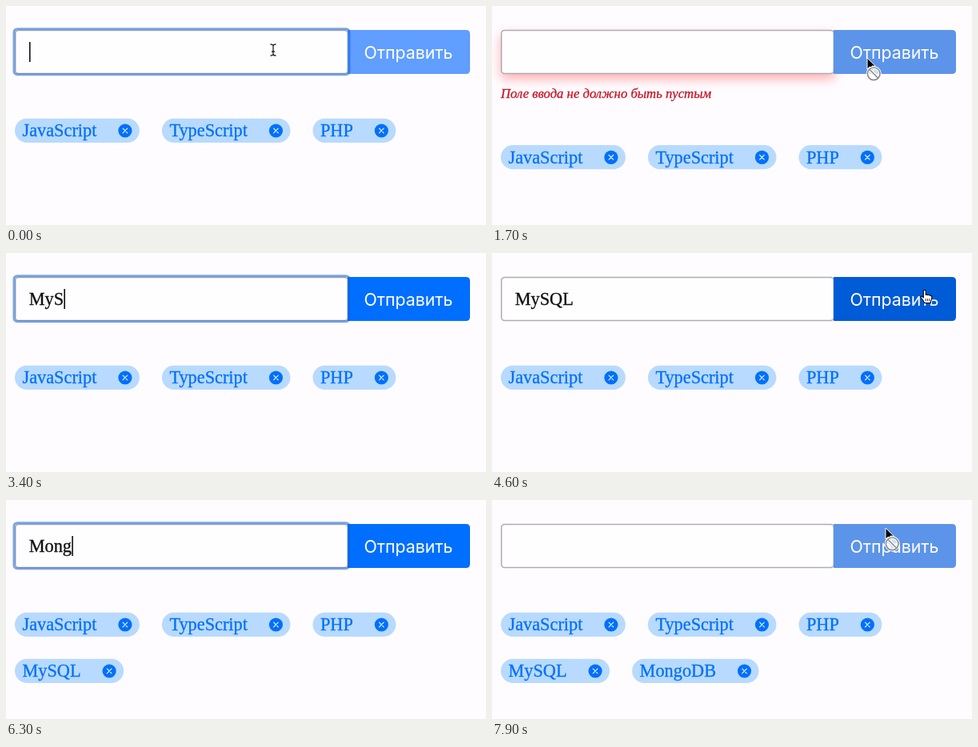
An HTML page that plays this animation: 600x274 px, repeating every 8 s.

```html
<!DOCTYPE html>
<html lang="ru">
<head>
<meta charset="utf-8">
<title>Теги</title>
<style>
  html, body { margin: 0; width: 100%; height: 100%; overflow: hidden; background: #fefcff; }
  svg { display: block; width: 600px; height: 274px; }
  .serif { font: 22.3px "Liberation Serif", Times, serif; stroke-width: .3; }
  .tag rect { fill: #b8daff; }
  .tag text { fill: #0070fa; stroke: #0070fa; }
  .tag circle { fill: #0070fa; }
  .tag path { stroke: #e4f1ff; stroke-width: 1.2; stroke-linecap: round; }
  .field { fill: #fefdff; stroke: #aeacae; stroke-width: 1.5; }
  .field.bad { filter: drop-shadow(0 6px 7px rgba(255, 50, 50, .38)); }
  .ring { fill: none; stroke: #0f62d8; stroke-opacity: .55; stroke-width: 3; }
  .label { font: 21.3px Inter, Roboto, sans-serif; fill: #fff; text-anchor: middle; }
  .error { font: italic 16.7px "Liberation Serif", Times, serif; fill: #c81424; stroke: #c81424; stroke-width: .3; }
  .typed { fill: #111; stroke: #111; }
  [hidden] { display: none; }
</style>
</head>
<body>
<svg viewBox="0 0 600 274">
  <rect id="field" class="field" x="11.75" y="30.4" width="415.5" height="54.2" rx="4"/>
  <path id="button" d="M427 30H575Q580 30 580 35V80Q580 85 575 85H427Z"/>
  <text class="label" x="503" y="66">Отправить</text>
  <rect id="ring" class="ring" x="10" y="28.7" width="419" height="57" rx="4"/>
  <text id="typed" class="serif typed" x="28.7" y="64.6"></text>
  <rect id="caret" y="45" width="1.6" height="25" fill="#111"/>
  <text id="error" class="error" x="11" y="115">Поле ввода не должно быть пустым</text>
  <g id="tags"></g>
  <g id="cursor">
    <path id="beam" d="M-3 -7Q0 -7 0 -5Q0 -7 3 -7M0 -5V5M-3 7Q0 7 0 5Q0 7 3 7M-1.5 2H1.5" fill="none" stroke="#222" stroke-width="1.3" stroke-linecap="round"/>
    <path id="arrow" d="M0 0V14L3.3 11L5.6 16.2L8.1 15.1L5.8 10.1H10.4Z" fill="#000" stroke="#fff" stroke-linejoin="round"/>
    <g id="ban" fill="none">
      <circle cx="8.2" cy="19.8" r="7.8" fill="#fff" fill-opacity=".7" stroke="#fff" stroke-width="3.6"/>
      <path d="M2.7 14.3L13.7 25.3" stroke="#fff" stroke-width="3.6"/>
      <circle cx="8.2" cy="19.8" r="7.8" stroke="#8c8c8c" stroke-width="1.6"/>
      <path d="M2.7 14.3L13.7 25.3" stroke="#8c8c8c" stroke-width="1.6"/>
    </g>
    <g id="hand" stroke="#000" stroke-linejoin="round" stroke-linecap="round">
      <path d="M-1.7 8V1Q-1.7 -.7 -.2 -.7Q1.2 -.7 1.2 1V5.5Q2.4 4.2 3.8 5.6Q5.2 4.7 6.3 6.2Q8.8 5.6 8.8 8.5Q8.8 11.5 7.4 13.3V15.5H-.6Q-1.4 12.5 -4.8 9.2Q-5.6 7.8 -4.3 7.2Q-3 6.9 -1.7 9Z" fill="#fff" stroke-width="1.1"/>
      <path d="M1.2 10.5V13M3.5 10.5V13M5.8 10.5V13" fill="none" stroke-width=".8"/>
    </g>
  </g>
</svg>
<script>
const LOOP = 8000, STEP = 100, KEY = 165, PRESS = 150, BLINK = 500;
const $ = id => document.getElementById(id);
const show = (id, on) => $(id).toggleAttribute('hidden', !on);
const ease = k => k * k * (3 - 2 * k);

const words = [
  { text: 'MySQL', start: 2930, sent: 4700 },
  { text: 'MongoDB', start: 5800, sent: 7900 }
];
const tags = [
  ...['JavaScript', 'TypeScript', 'PHP'].map(text => ({ text, sent: 0 })),
  ...words
];

// The field keeps focus until a press outside it or on the button.
const blurred = 800;
const focus = [
  { from: -200, to: blurred },
  { from: 2300, to: words[0].sent - PRESS },
  { from: 5300, to: words[1].sent - PRESS }
];

const home = { x: 334, y: 55 };
const moves = [
  { from: 200, to: 600, x: 350, y: 187 },
  { from: 800, to: 1100, x: 500, y: 132 },
  { from: 1250, to: 1700, x: 469, y: 65 },
  { from: 1900, to: 2400, x: 307, y: 58 },
  { from: 3850, to: 4200, x: 590, y: 21 },
  { from: 4200, to: 4500, x: 541, y: 47 },
  { from: 4750, to: 5300, x: 330, y: 58 },
  { from: 7200, to: 7700, x: 492, y: 35 }
];

// Tags flow in rows, each as wide as its text plus padding.
function layTags() {
  const left = 11, right = 580, gap = 28, row = 58, pad = 64;
  let x = left, y = 140.7;
  for (const { text } of tags) {
    $('tags').insertAdjacentHTML('beforeend',
      `<g class="tag"><rect height="30.3" rx="15.15"/><text class="serif" x="9.5" y="22.6">${text}</text>
       <circle cy="15.3" r="8.6"/><path d="M-2.8 12.5l5.6 5.6m0 -5.6l-5.6 5.6"/></g>`);
    const tag = $('tags').lastElementChild;
    const [box, label, dot, cross] = tag.children;
    const width = label.getComputedTextLength() + pad - 1;
    if (x + width > right) { x = left; y += row; }
    tag.setAttribute('transform', `translate(${x} ${y})`);
    box.setAttribute('width', width);
    dot.setAttribute('cx', width - 18);
    cross.setAttribute('transform', `translate(${width - 18} 0)`);
    x += width + gap;
  }
}

function pointer(t) {
  let { x, y } = home;
  for (const m of moves) {
    const k = ease(Math.min(1, Math.max(0, (t - m.from) / (m.to - m.from))));
    x += (m.x - x) * k;
    y += (m.y - y) * k;
  }
  return [x, y];
}

function draw(t) {
  const word = words.find(w => t >= w.start && t < w.sent);
  const keys = word ? Math.min(word.text.length, Math.floor((t - word.start) / KEY) + 1) : 0;
  const value = word ? word.text.slice(0, keys) : '';
  const held = focus.find(f => t >= f.from && t < f.to);
  const bad = t >= blurred && t < words[0].start;

  const lastKey = word ? word.start + (keys - 1) * KEY : -Infinity;
  const lit = held && (t - Math.max(held.from, lastKey)) % (2 * BLINK) < BLINK;
  $('typed').textContent = value;
  $('caret').setAttribute('x', 29 + (value ? $('typed').getComputedTextLength() : 0));
  show('caret', lit);
  show('ring', held);
  show('error', bad);
  $('field').classList.toggle('bad', bad);
  $('tags').setAttribute('transform', `translate(0 ${bad ? 33.3 : 0})`);
  tags.forEach((tag, i) => $('tags').children[i].toggleAttribute('hidden', t < tag.sent));

  // Typing hides the pointer until it moves again.
  const [x, y] = pointer(t);
  const seen = !word || t >= moves.find(m => m.from > word.start).from;
  const inRow = y >= 30 && y <= 85;
  const overField = inRow && x >= 11 && x < 428;
  const overButton = seen && inRow && x >= 428 && x < 580;
  const ready = overButton && value;
  $('cursor').setAttribute('transform', `translate(${x} ${y})`);
  show('cursor', seen);
  show('beam', overField);
  show('hand', ready);
  show('arrow', !overField && !ready);
  show('ban', overButton && !value);
  const [idle, hover] = value ? ['#006fff', '#005bd7'] : ['#609eff', '#5c94e9'];
  $('button').setAttribute('fill', overButton ? hover : idle);
}

layTags();
const start = performance.now();
function tick() {
  const t = (performance.now() - start) % LOOP;
  draw(Math.floor(t / STEP) * STEP);
  requestAnimationFrame(tick);
}
tick();
</script>
</body>
</html>
```
